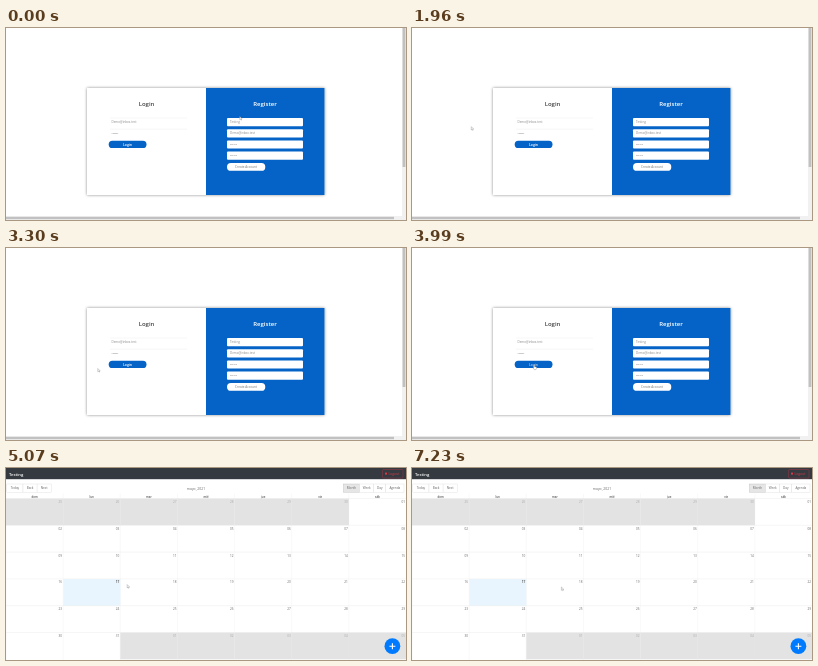
These frames come from a looping animation (400 px wide and 192 px high, 8 s). An HTML page:

```html
<!DOCTYPE html>
<html lang="en">
<head>
<meta charset="utf-8">
<title>Login and calendar</title>
<style>
html, body { margin: 0; width: 100%; height: 100%; overflow: hidden; background: #fff; }
svg { display: block; width: 100vw; height: 100vh; font-family: "Open Sans", Arial, sans-serif; }
.shadow { filter: drop-shadow(0 .8px 1.6px #0007); }
</style>
</head>
<body>
<svg viewBox="0 0 400 192">
  <g id="login"></g>
  <g id="calendar"></g>
  <g id="pointer" stroke="#888" stroke-width=".4" stroke-linejoin="round" fill="#fff">
    <path id="arrow" d="M0 0V3.3L.8 2.6L1.3 3.7L1.9 3.4L1.4 2.4H2.4Z"/>
    <path id="hand" d="M.8 .4Q1.2-.2 1.6.4V2L3.5 2.4V4L2.9 5H1.2L0 3.2L.8 3Z"/>
  </g>
</svg>
<script>
const $ = id => document.getElementById(id);
const BLUE = '#0563c7', RED = '#dc3545';
const MID = 'text-anchor="middle"', END = 'text-anchor="end"', BOLD = 'font-weight="600"';

const rect = (x, y, w, h, fill, more = '') =>
  `<rect x="${x}" y="${y}" width="${w}" height="${h}" fill="${fill}" ${more}/>`;
const text = (x, y, size, fill, label, more = '') =>
  `<text x="${x}" y="${y}" font-size="${size}" fill="${fill}" ${more}>${label}</text>`;
const line = (x1, y1, x2, y2, color = '#e8e8e8') =>
  `<path d="M${x1} ${y1}L${x2} ${y2}" stroke="${color}" stroke-width=".4"/>`;

function loginPage() {
  const title = (x, fill, label) => text(x, 78, 6, fill, label, `${MID} ${BOLD}`);
  const email = 'Demo@inbox.test', dots = '••••••';
  const fieldY = i => 90 + i * 11.2;
  let s = `<g class="shadow">${rect(81, 60, 237.5, 107, '#fff')}</g>`;
  s += rect(200, 60, 118.5, 107, BLUE);
  s += title(140.5, '#444', 'Login') + title(259, '#fff', 'Register');

  [email, dots].forEach((label, i) => {
    const y = fieldY(i);
    s += line(104, y, 181, y) + text(105.5, y + 5.3, 3, '#888', label);
  });
  s += rect(102.7, 112.8, 37.8, 7.2, BLUE, 'rx="3.6"');
  s += text(121.5, 117.7, 3.5, '#fff', 'Login', `id="loginLabel" ${MID} ${BOLD}`);

  ['Testing', email, dots, dots].forEach((label, i) => {
    const y = fieldY(i);
    s += rect(221, y, 76, 8.2, '#fff', 'rx="1"') + text(224, y + 5.2, 3, '#888', label);
  });
  s += rect(221, 135, 38.3, 7.8, '#fff', 'rx="3.9"');
  s += text(240, 140, 3.1, '#777', 'Create Account', MID);

  s += rect(396, 0, 4, 192, '#f1f1f1') + rect(396.6, 0, 2.8, 139, '#c1c1c1');
  s += rect(0, 188, 400, 4, '#f1f1f1') + rect(0, 188.8, 388, 2.4, '#c1c1c1');
  return s;
}

// Row of joined buttons, each as wide as its label needs
function toolbar(x, labels, active) {
  return labels.map(label => {
    const w = 5.7 + 2.1 * label.length, on = label === active;
    const button = rect(x, 16, w, 8.2, on ? '#e6e6e6' : '#fff', `stroke="${on ? '#bbb' : '#ddd'}" stroke-width=".4"`) +
      text(x + w / 2, 21.4, 3.1, '#666', label, MID);
    x += w;
    return button;
  }).join('');
}

function calendarPage() {
  const colW = 400 / 7, rowH = 26.8, top = 30.5;
  let s = rect(0, 0, 400, 192, '#fff') + rect(0, 0, 400, 11.2, '#343a40');
  s += text(3, 7.6, 4.2, '#fff', 'Testing', BOLD);
  s += rect(376.5, 1.5, 20.5, 8.6, 'none', `id="outBox" rx="1" stroke="${RED}" stroke-width=".4"`);
  s += rect(379, 4.6, 2, 2, RED) + text(382.4, 7, 3.4, RED, 'Logout');

  s += toolbar(.8, ['Today', 'Back', 'Next']);
  s += toolbar(337.4, ['Month', 'Week', 'Day', 'Agenda'], 'Month');
  s += text(190, 21.5, 3.4, '#666', 'mayo, 2021', MID);

  ['dom', 'lun', 'mar', 'mié', 'jue', 'vie', 'sáb'].forEach((name, i) => {
    const x = i * colW;
    s += text(x + colW / 2, 29.5, 2.9, '#555', name, `${MID} ${BOLD}`);
    s += line(x, 25.5, x, 192, '#f0f0f0');
  });
  for (let i = 0; i < 42; i++) {
    const col = i % 7, row = Math.floor(i / 7), x = col * colW, y = top + row * rowH;
    const day = new Date(2021, 3, 25 + i), date = day.getDate();
    const outside = day.getMonth() !== 4, today = !outside && date === 17;
    if (outside || today) s += rect(x, y, colW + .1, rowH, today ? '#e8f5ff' : '#e3e3e3');
    s += line(x, y, x + colW, y);
    s += text(x + colW - 1, y + 4.5, 3.1, outside ? '#aaa' : '#666',
      String(date).padStart(2, '0'), END + (today ? ' font-weight="700"' : ''));
  }

  s += '<circle cx="386.4" cy="178.2" r="7.9" fill="#007bff"/>';
  s += '<path id="plus" d="M386.4 175.2v6m-3-3h6" stroke="#fff" stroke-width="1.1"/>';
  return s;
}

// Keys are [time, a, b], joined by straight lines
function blend(keys, t) {
  const i = keys.findIndex(k => k[0] > t);
  if (i < 1) return keys.at(i).slice(1);
  const [p, q] = [keys[i - 1], keys[i]], f = (t - p[0]) / (q[0] - p[0]);
  return [1, 2].map(d => p[d] + (q[d] - p[d]) * f);
}

// Circling the cards: angle in degrees and share of the full ellipse
const orbit = [[1105, -42, .46], [1960, -172, 1], [2870, -425, 1], [3300, -560, .77]];
const glide = [[3300, 94, 123], [3500, 112, 126], [3700, 119, 117], [3980, 121.2, 116.6],
  [6180, 121.2, 116.6], [6420, 134, 111.3], [6950, 134, 111.3], [7180, 149.4, 119]];

function pointerAt(t) {
  const held = 1200 + Math.floor((t - 1200) / 95) * 95;
  if (held >= 3300) return blend(glide, held);
  const [angle, share] = blend(orbit, held), a = angle * Math.PI / 180;
  return [189 + 131 * share * Math.cos(a), 107 + 60 * share * Math.sin(a)];
}

const show = (id, on) => $(id).style.display = on ? '' : 'none';

function draw(now) {
  const t = now % 8000, loaded = t >= 4780, hand = t >= 3700 && t < 5070;
  show('calendar', t >= 4680);
  show('plus', loaded);
  show('hand', hand);
  show('arrow', !hand);
  $('outBox').style.opacity = loaded ? .8 : .2;
  $('loginLabel').style.opacity = hand ? .65 : 1;
  $('pointer').setAttribute('transform', `translate(${pointerAt(t)})`);
  requestAnimationFrame(() => draw(performance.now() - begin));
}

$('login').innerHTML = loginPage();
$('calendar').innerHTML = calendarPage();
const begin = performance.now();
draw(0);
</script>
</body>
</html>
```
